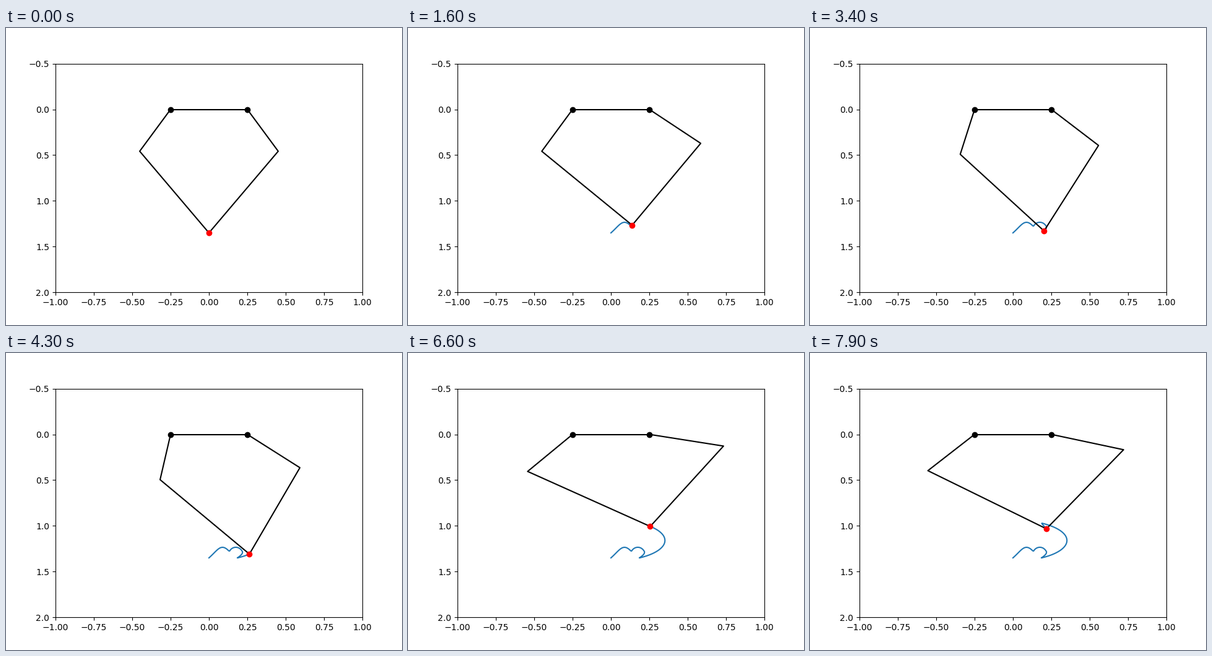
These frames come from a looping animation (640 by 480 pixels, 8000 ms). A matplotlib script:

```python
import numpy as np
import matplotlib.pyplot as plt
from matplotlib.animation import FuncAnimation

FRAMES, STEP_MS = 80, 100
UPPER, LOWER = 0.5, 1.0
BASE_L, BASE_R = np.array([-0.25, 0.0]), np.array([0.25, 0.0])
ASPECT = 0.596  # screen height of a y unit relative to an x unit
U = np.linspace(0, 1, 200)[:, None]


def bezier(*points):
    """Bezier curve through any number of control points (de Casteljau)."""
    p = [np.array(q) * np.ones_like(U) for q in points]
    while len(p) > 1:
        p = [(1 - U) * a + U * b for a, b in zip(p, p[1:])]
    return p[0]


def ellipse(cx, cy, rx, ry, a0, a1):
    a = np.radians(a0 + (a1 - a0) * U)
    return np.hstack([cx + rx * np.cos(a), cy + ry * np.sin(a)])


def timed(curve, t0, t1):
    """Times at which a curve's points are passed at constant screen speed."""
    step = np.hypot(*(np.diff(curve, axis=0) * [1, ASPECT]).T)
    s = np.append(0, np.cumsum(step))
    return t0 + (t1 - t0) * s / s[-1]


# Pieces of the drawn outline, each with the frame at which it ends
pieces = [
    (bezier((0, 1.35), (.06, 1.262), (.078, 1.18), (.133, 1.28)), 14.5),
    (bezier((.133, 1.28), (.152, 1.218), (.2, 1.218), (.219, 1.285)), 31),
    (bezier((.219, 1.285), (.222, 1.31), (.185, 1.35)), 36),
    (ellipse(0, 1.16, .352, .224, 58.3, -58.3), 72.3),
    (bezier((.185, .97), (.218, 1.032)), 79),
]
ends = [0] + [end for _, end in pieces]
times = np.concatenate([timed(c, t0, t1)
                        for (c, t1), t0 in zip(pieces, ends)])
outline = np.vstack([c for c, _ in pieces])
path = np.column_stack([np.interp(np.arange(FRAMES), times, v)
                        for v in outline.T])


def elbow(base, tip, side):
    """Joint between an upper and a lower link, bent to the given side."""
    d = tip - base
    dist = np.hypot(*d)
    u = d / dist
    along = (UPPER**2 - LOWER**2 + dist**2) / (2 * dist)
    off = np.sqrt(UPPER**2 - along**2)
    return base + along * u + side * off * np.array([u[1], -u[0]])


fig, ax = plt.subplots(figsize=(6.4, 4.8), dpi=100)
ax.set_xlim(-1, 1)
ax.set_ylim(2, -0.5)

trail, = ax.plot([], [], color="C0")
links, = ax.plot([], [], "k")
ax.plot(*zip(BASE_L, BASE_R), "ko-")
tip_dot, = ax.plot([], [], "ro")


def update(i):
    tip = path[i]
    chain = [BASE_L, elbow(BASE_L, tip, -1), tip,
             elbow(BASE_R, tip, 1), BASE_R]
    links.set_data(*zip(*chain))
    trail.set_data(*path[:i + 1].T)
    tip_dot.set_data([tip[0]], [tip[1]])
    return trail, links, tip_dot


anim = FuncAnimation(fig, update, frames=FRAMES, interval=STEP_MS,
                     repeat=True, repeat_delay=0)
plt.show()
```
